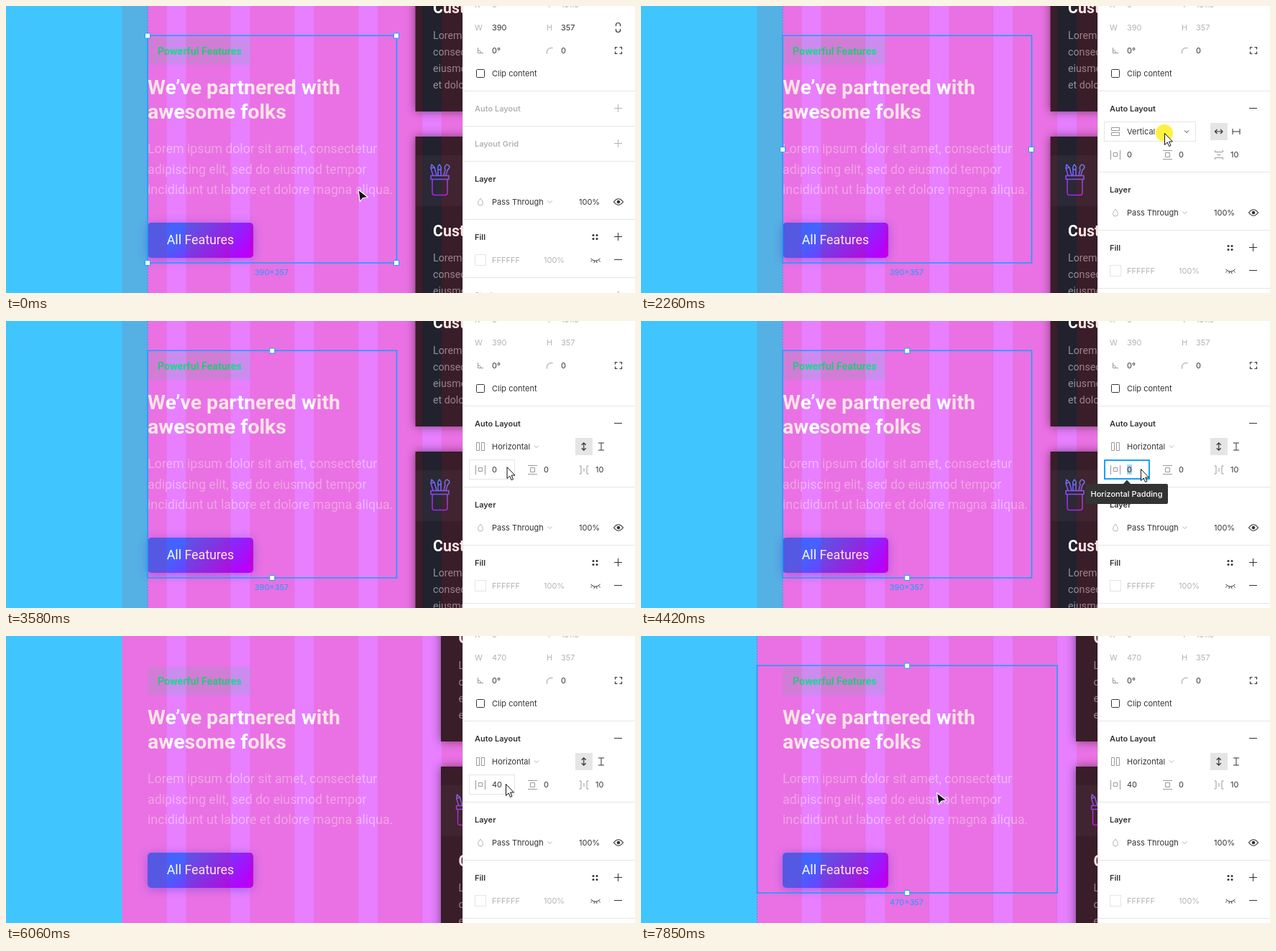
Recreate the animation shown at these times as an HTML page. Size 875 by 400 pixels, loop 9950 ms.

```html
<!DOCTYPE html>
<html lang="en">
<head>
<meta charset="utf-8">
<title>Auto layout padding</title>
<style>
html, body { margin: 0; width: 100%; height: 100%; overflow: hidden; background: #fff; }
svg { display: block; width: 875px; height: 400px; }
text { white-space: pre; }
.r { font-family: Roboto, sans-serif; fill: #fff; }
.b { font-weight: 700; }
.ui { font: 11px Inter, sans-serif; fill: #333; }
.ui .title { font-weight: 600; }
.ui .dim { fill: #b3b3b3; }
.ln { fill: none; stroke: #333; }
.mid { fill: none; stroke: #999; }
.pale { fill: none; stroke: #b3b3b3; }
.rule { stroke: #e5e5e5; }
</style>
</head>
<body>
<svg id="stage" viewBox="0 0 875 400"></svg>
<script>
const LOOP = 9950, SCALE = 8 / 9, SHIFT = 40 * SCALE;
const BLUE = '#18a0fb';

const text = (x, y, s, cls = '', more = '') => `<text x="${x}" y="${y}" class="${cls}" ${more}>${s}</text>`;
const rect = (x, y, w, h, more = '') => `<rect x="${x}" y="${y}" width="${w}" height="${h}" ${more}/>`;
const path = (d, cls = 'ln', more = '') => `<path d="${d}" class="${cls}" ${more}/>`;
const rule = y => path(`M636 ${y}H875`, 'rule');
const plus = (y, cls = 'ln', more = '') => path(`M846 ${y}h11M851.5 ${y - 5.5}v11`, cls, more);
const chevron = (x, y, cls = 'pale') => path(`M${x - 3} ${y - 1.5}l3 3 3-3`, cls);

function defs() {
  return `<defs>
    <linearGradient id="btnFill" x1="0" y1=".35" x2="1" y2=".65">
      <stop offset="0" stop-color="#3f64fc"/><stop offset=".25" stop-color="#4562ff"/>
      <stop offset="1" stop-color="#b900fa"/></linearGradient>
    <linearGradient id="iconInk" x1=".7" y1="0" x2=".3" y2="1">
      <stop offset="0" stop-color="#5c86ff"/><stop offset=".55" stop-color="#8a4df5"/>
      <stop offset="1" stop-color="#ad22ee"/></linearGradient>
    <filter id="soft" x="-50%" y="-50%" width="200%" height="200%"><feGaussianBlur stdDeviation="7"/></filter>
    <filter id="tight" x="-20%" y="-30%" width="140%" height="170%"><feGaussianBlur stdDeviation="4"/></filter>
  </defs>`;
}

function lines(x, y, step, size, rows, more) {
  return rows.map((s, i) => text(x, y + i * step, s, 'r', `font-size="${size}" ${more}`)).join('');
}

function card(top, height) {
  const copy = ['Lorem ipsum', 'consectetur', 'eiusmod', 'et dolore'];
  return rect(569.5, top, 320, height, 'fill="#000" opacity=".5" filter="url(#soft)"')
    + rect(569.5, top, 320, height, 'fill="#22212e"');
}

function cardCopy(y) {
  return text(594, y, 'Customize', 'r b', 'font-size="21.33"')
    + lines(594, y + 35.5, 23.1, 14.22, ['Lorem ipsum', 'consectetur', 'eiusmod', 'et dolore'], 'opacity=".5"');
}

function toolJar() {
  return `<g fill="none" stroke="url(#iconInk)" stroke-width="1.5" stroke-linejoin="round">
    <path d="M591 236.5h25v5h-25zM593 241.5v19a3 3 0 0 0 3 3h15a3 3 0 0 0 3-3v-19
      M594 236l-3-10 1-5 4 4 3 11M601 236v-9q-1-3 2-6q3 3 2 6v9M601 228h4
      M609 236l2-8q-2-4 2-7q4 1 4 4l-3 4-2 7M592 226l4-1"/></g>`;
}

function canvas() {
  let cols = '';
  for (let i = 0; i < 6; i++) cols += rect(161.5 + i * 100 * SCALE, 0, 70 * SCALE, 400);
  return rect(0, 0, 875, 400, 'fill="#41c5ff"')
    + rect(197, 0, 700, 400, 'id="page" fill="#e77fff"')
    + '<g id="cards">' + card(-60, 207) + card(182, 280)
    + rect(569.5, 208, 320, 71, 'fill="#fff" opacity=".035"')
    + toolJar() + cardCopy(10) + cardCopy(320.5) + '</g>'
    + rect(197, 43, 143, 39, 'fill="#19db87" opacity=".13"')
    + text(211, 67.5, 'Powerful Features', 'r b', 'font-size="14.22" style="fill:#12dd8c"')
    + lines(197, 122.7, 34.1, 28.44, ['We’ve partnered with', 'awesome folks'], 'font-weight="700"')
    + lines(197, 205.3, 28.45, 17.78, [
      'Lorem ipsum dolor sit amet, consectetur',
      'adipiscing elit, sed do eiusmod tempor',
      'incididunt ut labore et dolore magna aliqua.'], 'opacity=".42"')
    + rect(197, 304, 147, 49, 'rx="5" fill="#4a3ce8" opacity=".45" filter="url(#soft)"')
    + rect(197, 302, 147, 49, 'rx="5" fill="url(#btnFill)"')
    + text(270.5, 332.3, 'All Features', 'r', 'font-size="17.78" text-anchor="middle"')
    + `<g fill="#f00" opacity=".1">${cols}</g>`;
}

function selection() {
  return `<g id="sel">
    <path id="edge" stroke="${BLUE}" stroke-dasharray="2 2" fill="none"/>
    <rect id="outline" y="41.25" height="316.75" fill="none" stroke="${BLUE}" stroke-width="1.6"/>
    <path id="handles" fill="#fff" stroke="${BLUE}"/>
    <text id="size" class="ui" x="369.5" y="375" text-anchor="middle" style="fill:${BLUE}"></text></g>`;
}

function autoRows() {
  const arrow = 'M798.5 175h10.5M801.5 172l-3 3 3 3M806 172l3 3-3 3';
  return '<g id="autoRows">'
    + rect(837, 128, 30, 30, 'id="minusBg" fill="#f0f0f0"') + path('M846 142.5h11')
    + rect(644.5, 161.5, 127, 27, 'id="dirHover" fill="#fff" stroke="#e5e5e5"')
    + path('M654.5 169.5h11v4h-11zM654.5 176.5h11v4h-11z', 'mid', 'id="dirIcon"')
    + text(676, 179, 'Vertical', '', 'id="dir"')
    + `<g id="dirChevron">${chevron(0, 175)}</g><g id="dirChevronOn">${chevron(759, 175, 'ln')}</g>`
    + rect(792, 163, 24, 24, 'fill="#e5e5e5"')
    + `<g id="resize">${path(arrow, 'ln', 'stroke-width="1.2"')}</g>`
    + path('M823 171v8M833 171v8M823 175h10', 'ln', 'id="hug"')
    + rect(644.5, 193.5, 63, 27, 'id="padHover" fill="none" stroke="#e5e5e5"')
    + rect(645, 194, 62, 26, `id="padFocus" fill="#fff" stroke="${BLUE}" stroke-width="2"`)
    + rect(676, 200, 7, 14, 'id="padMark" fill="#a9d5f7"')
    + path('M653.5 201v13M666.5 201v13M657.5 204.5h5v5h-5z', 'mid')
    + text(676, 211, '0', '', 'id="pad"')
    + path('M726 201.5h13M726 213.5h13M729.5 204.5h6v6h-6z', 'mid') + text(748, 211, '0')
    + path('M798.5 201v2.5h11v-2.5M798.5 214v-2.5h11v2.5M801.5 207.5h5', 'mid', 'id="gapIcon"')
    + text(820, 211, '10') + '</g>';
}

function lowerRows() {
  const dots = [[817, 319.5], [822, 319.5], [817, 324.5], [822, 324.5]]
    .map(([x, y]) => `<circle cx="${x}" cy="${y}" r="1.5"/>`).join('');
  return '<g id="lower">' + rule(216.5) + text(652, 245, 'Layer', 'title')
    + path('M660 268q-3.5 4-3.5 6.5a3.5 3.5 0 0 0 7 0q0-2.5-3.5-6.5z', 'pale')
    + text(676, 277, 'Pass Through') + chevron(756.5, 273) + text(797, 277, '100%')
    + path('M845.5 273q6.500-8.500 13 0q-6.500 8.500-13 0z', 'ln', 'stroke-width="1.2"')
    + '<circle cx="852" cy="273" r="2.3"/>'
    + rule(297.5) + text(652, 326, 'Fill', 'title') + dots + plus(321.5)
    + rect(652.5, 346.5, 15, 15, 'fill="#fff" stroke="#e5e5e5"')
    + text(676, 358, 'FFFFFF', 'dim') + text(748, 358, '100%', 'dim')
    + path('M813.5 352q6.500 6.500 13 0M815 354.500l-1.500 2M818.500 355.500l-.5 2.500M821.500 355.500l.5 2.500M825 354.500l1.500 2')
    + path('M846 353.500h11') + rule(378.5)
    + text(652, 407, 'Stroke', 'title dim') + plus(402.5, 'pale') + '</g>';
}

function panel() {
  return '<g class="ui">' + rect(635, 0, 240, 400, 'fill="#fff"') + path('M635.5 0V400', 'rule')
    + text(652, 2, 'X', 'dim') + text(676, 2, '0', 'dim') + text(752, 2, 'Y', 'dim') + text(772, 2, '151.5', 'dim')
    + text(652, 34, 'W', 'dim') + text(676, 34, '390', '', 'id="w"')
    + text(752, 34, 'H', 'dim') + text(772, 34, '357', '', 'id="h"')
    + path('M848.5 28v-1.500a3 3 0 0 1 6 0v1.500M848.500 32v1.500a3 3 0 0 0 6 0v-1.500', 'ln', 'id="link" stroke-width="1.2"')
    + path('M656.5 58v7.500h7.500M656.500 61.500q4 0 4 4', 'mid') + text(676, 66, '0°')
    + path('M752.5 66.500v-2q0-6 6-6h2', 'mid') + text(772, 66, '0')
    + path('M847.5 60.500v-3h3M853.500 57.500h3v3M856.500 63.500v3h-3M850.500 66.500h-3v-3', 'ln', 'stroke-width="1.2"')
    + rect(654.5, 88.5, 11, 11, 'rx="1" fill="none" stroke="#333"') + text(676, 98, 'Clip content')
    + rule(118.5) + rect(837, 128, 30, 30, 'id="plusBg" fill="#f0f0f0"')
    + text(652, 147, 'Auto Layout', 'title', 'id="autoTitle"')
    + `<g id="plainRows">${plus(142.5, 'pale', 'id="addAuto"')}${rule(167.5)}`
    + text(652, 196, 'Layout Grid', 'title dim') + plus(191.5, 'pale') + '</g>'
    + autoRows() + lowerRows() + '</g>';
}

function popups() {
  return '<g class="ui" id="menu">'
    + rect(644, 134, 128, 64, 'fill="#000" opacity=".35" filter="url(#tight)"')
    + rect(644, 131, 128, 64, 'rx="2" fill="#222"')
    + rect(644, 139, 128, 24, `id="menuRow" fill="${BLUE}"`)
    + text(676, 155, 'Horizontal', '', 'style="fill:#fff" font-weight="500"')
    + text(676, 179, 'Vertical', '', 'style="fill:#fff" font-weight="500"')
    + path('M656 175l3 3 5.500-6', '', 'fill="none" stroke="#fff" stroke-width="1.6"') + '</g>'
    + '<g class="ui" id="tip">' + path('M670.500 227.500l5.500-6 5.500 6z', '')
    + rect(618, 227, 115, 28, 'rx="2"')
    + text(675.5, 245, 'Horizontal Padding', '', 'style="fill:#fff" font-weight="500" text-anchor="middle"') + '</g>';
}

function pointer() {
  return `<g id="mouse"><circle id="click" r="12" fill="#fff02c" opacity=".9"/>
    <path id="dark" d="M0 0L2.500 16.500L6.500 11.500L13.500 10.500Z" fill="#111" stroke="#fff" stroke-width="1.2" stroke-linejoin="round"/>
    <path id="light" d="M.5.5V16.500L4.200 13L6.600 18.500L9 17.500L6.600 12H11.500Z" fill="#fff" stroke="#111"/></g>`;
}

const stage = document.getElementById('stage');
stage.innerHTML = defs() + canvas() + selection() + panel() + popups() + pointer();

const el = {};
stage.querySelectorAll('[id]').forEach(n => el[n.id] = n);
const show = (id, on) => el[id].setAttribute('display', on ? 'inline' : 'none');
const set = (id, name, value) => el[id].setAttribute(name, value);
const write = (id, s) => { if (el[id].textContent !== s) el[id].textContent = s; };
const tint = (id, on) => el[id].style.fill = on ? '#333' : '#b3b3b3';

// start, end, steps, x, y
const moves = [
  [130, 760, 9, 849, 147],
  [1390, 2020, 9, 728, 177],
  [2570, 2800, 4, 723, 153],
  [3190, 3660, 7, 695, 206],
  [6840, 7220, 6, 411.5, 218.5]
];
const clicks = [[930, 1000], [2260, 2340], [3040, 3120], [3810, 3890], [7700, 7850]];
const ease = p => p * p * (3 - 2 * p);
const within = (t, a, b) => t >= a && t < b;

function mouseAt(t) {
  let x = 490, y = 256;
  for (const [start, end, n, tx, ty] of moves) {
    if (t < start) break;
    const k = Math.min(n, Math.floor((t - start) / (end - start) * (n - 1) + 0.08) + 1);
    const p = ease(k / n);
    x += (tx - x) * p;
    y += (ty - y) * p;
  }
  return [x, y];
}

function draw(t) {
  const [mx, my] = mouseAt(t);
  const over = (x, y, w, h) => mx >= x && mx < x + w && my >= y && my < y + h;
  const auto = t >= 1170, horizontal = t >= 3190, wide = t >= 6060;
  const menu = within(t, 2340, 3190), focus = within(t, 3890, 6060);
  const grow = wide ? SHIFT : 0;
  const left = 197 - grow, right = 543.5 + grow;

  set('page', 'x', left);
  set('cards', 'transform', `translate(${grow} 0)`);

  show('sel', !within(t, 6060, 6840));
  set('edge', 'd', `M${left} 0V41M${left} 358V400`);
  set('outline', 'x', left);
  set('outline', 'width', right - left);
  const mid = (left + right) / 2;
  const grips = horizontal ? [[mid, 41.5], [mid, 358]]
    : auto ? [[left, 200], [right - 0.5, 200]]
    : [[left, 41.5], [right - 0.5, 41.5], [left, 358], [right - 0.5, 358]];
  set('handles', 'd', grips.map(([x, y]) => `M${x - 3.5} ${y - 3.5}h7v7h-7z`).join(''));
  write('size', wide ? '470×357' : '390×357');

  write('w', wide ? '470' : '390');
  tint('w', !auto);
  tint('h', !auto);
  show('link', !auto);
  show('plainRows', !auto);
  show('autoRows', auto);
  set('lower', 'transform', `translate(0 ${auto ? 15 : 0})`);
  const lit = auto || over(636, 119, 239, 48);
  tint('autoTitle', lit);
  set('addAuto', 'class', lit ? 'ln' : 'pale');
  const pressed = t >= 930 && over(837, 128, 30, 30);
  show('plusBg', pressed && !auto);
  show('minusBg', pressed && auto);

  const turn = (cx, cy) => horizontal ? `rotate(90 ${cx} ${cy})` : '';
  const dirHover = over(644, 161, 128, 28) && !menu;
  write('dir', horizontal ? 'Horizontal' : 'Vertical');
  set('dirIcon', 'transform', turn(660, 175));
  set('resize', 'transform', turn(803.75, 175));
  set('hug', 'transform', turn(828, 175));
  set('gapIcon', 'transform', turn(804, 207.5));
  set('dirChevron', 'transform', `translate(${horizontal ? 738 : 724} 0)`);
  show('dirHover', dirHover);
  show('dirChevron', !dirHover);
  show('dirChevronOn', dirHover);

  show('padHover', over(644, 193, 64, 28) && !focus);
  show('padFocus', focus);
  show('padMark', within(t, 3890, 5360));
  write('pad', t < 5360 ? '0' : t < 5660 ? '4' : '40');

  show('menu', menu);
  set('menuRow', 'y', my < 163 ? 139 : 163);
  show('tip', within(t, 4420, 5360));

  set('mouse', 'transform', `translate(${mx} ${my})`);
  show('click', clicks.some(([a, b]) => within(t, a, b)));
  show('dark', mx < 635);
  show('light', mx >= 635);
}

const began = performance.now();
function tick() {
  draw((performance.now() - began) % LOOP);
  requestAnimationFrame(tick);
}
draw(0);
requestAnimationFrame(tick);
</script>
</body>
</html>
```
